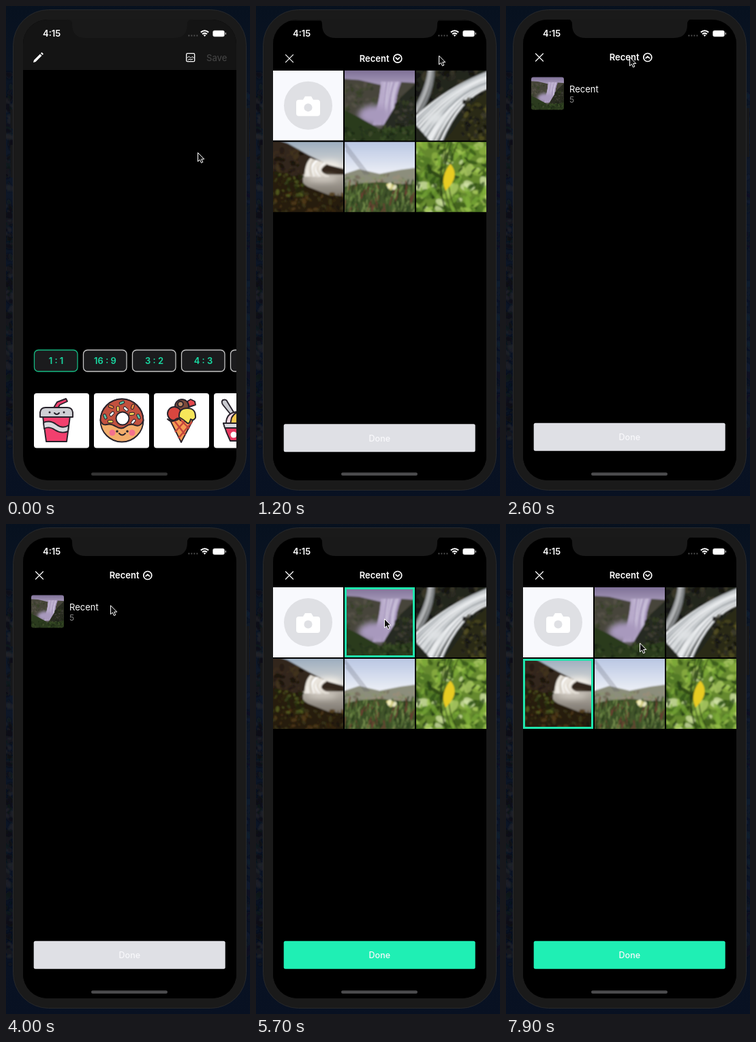
Animation, 358 px wide and 720 px high, one loop 8000 ms. Source, as an HTML page:

```html
<!DOCTYPE html>
<html lang="en">
<head>
<meta charset="utf-8">
<title>Photo picker</title>
<style>
  html, body { margin: 0; width: 100%; height: 100%; overflow: hidden; background: #0a1020; }
  svg { display: block; width: 100vw; height: 100vh; }
  text { font-family: Inter, "Liberation Sans", sans-serif; font-size: 13px; fill: #fff; }
  .b { font-weight: 600; }
  .mid { text-anchor: middle; }
  .ol { stroke: #27222b; stroke-width: 1.9; stroke-linejoin: round; stroke-linecap: round; }
  .ln { fill: none; stroke: #fff; stroke-linecap: round; stroke-linejoin: round; }
</style>
</head>
<body>
<svg id="stage" viewBox="0 0 358 720">
  <defs>
    <linearGradient id="desk" x2="0" y2="1">
      <stop stop-color="#07111f"/><stop offset=".3" stop-color="#0f1828"/><stop offset="1" stop-color="#081122"/>
    </linearGradient>
    <linearGradient id="dusk" x2="0" y2=".3"><stop stop-color="#6d5f88"/><stop offset="1" stop-color="#b3a6c4"/></linearGradient>
    <linearGradient id="dawn" x2="0" y2=".45"><stop stop-color="#8ea3ba"/><stop offset="1" stop-color="#e6e1d9"/></linearGradient>
    <linearGradient id="lake" x2="0" y2="1"><stop stop-color="#b5afa6"/><stop offset="1" stop-color="#6a645c"/></linearGradient>
    <linearGradient id="haze" x2="0" y2=".5"><stop stop-color="#b0bfdf"/><stop offset="1" stop-color="#f1f3f8"/></linearGradient>
    <filter id="soft"><feGaussianBlur stdDeviation=".8"/></filter>
    <filter id="mist" x="-1" y="-1" width="3" height="3"><feGaussianBlur stdDeviation="4"/></filter>
    <clipPath id="screen"><rect x="25" y="20" width="313" height="677" rx="36"/></clipPath>
    <clipPath id="cell"><rect width="103" height="103"/></clipPath>
    <clipPath id="thumb"><rect width="103" height="103" rx="7"/></clipPath>
    <clipPath id="below"><rect x="25" y="93" width="313" height="513"/></clipPath>
  </defs>

  <rect width="358" height="720" fill="url(#desk)"/>
  <g id="rock" filter="url(#soft)"></g>
  <path d="M8.500 152v28M8.500 204v48M355 150v72" stroke="#17181a" stroke-width="4"/>
  <rect x="10.500" y="5.500" width="342" height="706" rx="52" fill="#1a1a1a" stroke="#28292b"/>

  <g clip-path="url(#screen)">
    <rect x="25" y="20" width="313" height="677"/>
    <rect x="25" y="20" width="313" height="74" fill="#141414"/>
    <path d="M40 83l1-3.500 9-9 2.500 2.500-9 9zM51 69.500l1.500-1.500 2.500 2.500-1.500 1.500z" fill="#fff"/>
    <rect class="ln" x="264.700" y="69.700" width="12" height="12" rx="1.500" stroke-width="1.300"/>
    <path class="ln" d="M266 76l2.500-2 2.500 2.500 2-2 2.500 1.500M267 79.500l2-1.500 2 1 3-1"/>
    <text x="294" y="80.500" style="fill:#414141;font-weight:500">Save</text>
    <g id="ratios"></g>
    <g id="cards"></g>

    <g id="modal">
      <rect x="25" y="20" width="313" height="677"/>
      <path class="ln" d="M43.500 70l11 11m0-11l-11 11" stroke-width="1.200"/>
      <text x="151.800" y="80.300" class="b">Recent</text>
      <g id="chev" stroke-width="1.700"><circle class="ln" r="6"/><path class="ln" d="M-2.700-1.200L0 1.500 2.700-1.200"/></g>
      <g id="grid"></g>
      <rect id="pick" width="100" height="100" fill="none" stroke="#1fe6ad" stroke-width="3"/>
      <g clip-path="url(#below)">
        <g id="list">
          <rect x="25" y="93" width="313" height="513"/>
          <g id="album" transform="translate(37 104.500) scale(.466)"></g>
          <text x="93" y="126.500">Recent</text>
          <text x="93" y="142" style="font-size:12px;fill:#8a8a8a">5</text>
        </g>
      </g>
      <rect id="btn" x="40.700" y="612.700" width="281" height="41" rx="2.500"/>
      <text x="181.300" y="638" class="mid" style="font-size:12.500px;font-weight:500;fill:#f8f8fb">Done</text>
    </g>

    <rect id="home" x="125" y="685.500" width="112" height="4.500" rx="2.200"/>
    <text x="54" y="45" class="b">4:15</text>
    <path d="M267.500 43.500h14" stroke="#555" stroke-width="1.800" stroke-dasharray="1.800 2.200"/>
    <path class="ln" d="M285.800 38.600q5.700-4.600 11.400 0M288 41.300q3.500-2.800 7 0" stroke-width="2" style="stroke-linecap:butt"/>
    <path d="M289.700 42.800q1.800-1.400 3.600 0l-1.800 2.200z" fill="#fff"/>
    <rect x="303.500" y="36" width="17" height="9" rx="2.500" fill="#fff" stroke="#aaa" stroke-width=".6"/>
    <path d="M322.300 39v3" stroke="#aaa" stroke-width="1.400"/>
  </g>
  <path d="M89 19Q97 19 97 27Q97 47 117 47H246Q266 47 266 27Q266 19 274 19Z" fill="#191919"/>
  <path id="cursor" d="M0 0V13L3 10.400 5 15 7.300 14 5.300 9.500H9.300Z" fill="#111" stroke="#fff" stroke-linejoin="round"/>
</svg>

<script>
const $ = id => document.getElementById(id);
const repeat = (n, fn) => Array.from({ length: n }, (_, i) => fn(i)).join('');

let seed = 71;
const rnd = (lo = 0, hi = 1) => {
  seed = seed * 16807 % 2147483647;
  return +(lo + (hi - lo) * seed / 2147483647).toFixed(2);
};
const any = list => list[Math.floor(rnd(0, list.length - .01))];

const fullRect = fill => `<rect x="-9" y="-9" width="121" height="121" fill="${fill}"/>`;
const fog = (x, y, rx, ry, fill) => `<ellipse cx="${x}" cy="${y}" rx="${rx}" ry="${ry}" fill="${fill}" filter="url(#mist)"/>`;

// Ground below evenly spaced ridge heights.
function hill(ys, fill) {
  const step = 121 / (ys.length - 1);
  return `<path d="M-9 112${ys.map((y, i) => `L${i * step - 9} ${y}`).join('')}V112Z" fill="${fill}"/>`;
}

// Scattered leaves or stones in a box, flattened by a factor.
function blobs(n, x, y, w, h, r, cols, flat = .6) {
  return repeat(n, () => {
    const s = r * rnd(.4, 1.5);
    return `<ellipse rx="${s}" ry="${s * flat}" fill="${any(cols)}" opacity=".75" ` +
      `transform="translate(${rnd(x, x + w)} ${rnd(y, y + h)}) rotate(${rnd(0, 180)})"/>`;
  });
}

// Strands of water from one edge [x, y, dx, dy] over a bend to another edge.
function flow(n, a, bend, b, cols, wide = 2.5) {
  return repeat(n, () => {
    const u = rnd(), v = u + rnd(-.1, .1);
    return `<path d="M${a[0] + a[2] * u} ${a[1] + a[3] * u}Q${bend[0] + 12 * v} ${bend[1] + 14 * v} ` +
      `${b[0] + b[2] * v} ${b[1] + b[3] * v}" stroke="${any(cols)}" stroke-width="${wide}"/>`;
  });
}

function grass(n, top, cols) {
  return repeat(n, i => {
    const y = top + (112 - top) * i / n;
    return `<path d="M${rnd(-5, 108)} ${y}l${rnd(-3, 6)} ${rnd(-16, -6)}" stroke="${any(cols)}" stroke-width="1.600"/>`;
  });
}

const STONE = ['#171814', '#2b2b22', '#3d3c2c', '#111210'];
const WATER = ['#eceef0', '#c6cacd', '#a2a7ab', '#dcdfe1'];

const photos = [
  // Violet waterfall
  () => fullRect('url(#dusk)') + hill([12, 14, 21, 17, 19], '#46453a') +
    blobs(70, -5, 20, 50, 40, 3, ['#363c2a', '#4f4f3c', '#3c452c', '#57534a']) +
    flow(45, [54, 17, 28, 0], [54, 42], [44, 80, 36, 0], ['#c9bfd9', '#a595bb', '#b8aacb']) +
    fog(44, 66, 24, 15, '#a899bd') +
    hill([130, 112, 90, 40, 12], '#282b20') +
    blobs(55, 74, 36, 32, 50, 3, ['#232a1a', '#364024', '#191e15', '#43423a']) +
    hill([54, 69, 86, 84, 78], '#2b3b1e') +
    blobs(70, -5, 82, 112, 24, 3, ['#25341a', '#3a4f26', '#1c2815', '#465030']),

  // Stream between rocks
  () => fullRect('#24251e') + blobs(80, -5, -5, 110, 60, 5, STONE) +
    flow(10, [18, -6, 10, 0], [18, 20], [-6, 62, 16, 0], ['#8f9294', '#6f7375', '#b0b2b4']) +
    flow(60, [110, 0, 0, 24], [50, 22], [-6, 74, 36, 40], WATER) +
    fog(28, 70, 14, 8, '#dfe2e4') +
    hill([150, 128, 92, 48, 24], '#2c2b17') +
    blobs(80, 68, 42, 40, 62, 3.5, [...STONE, '#4a481d', '#5c5824']),

  // Waterfall by a lake
  () => fullRect('url(#dawn)') + fog(82, 36, 18, 8, '#f3efe8') +
    hill([-8, 2, 19, 34, 42], '#31251a') +
    blobs(70, -5, 12, 48, 44, 4, ['#241b13', '#3a2b1c', '#443520', '#17120d']) +
    `<rect x="44" y="48" width="70" height="40" fill="url(#lake)"/>` +
    flow(40, [53, 24, 26, 8], [48, 30], [46, 51, 38, 0], ['#fff', '#e9e4dc', '#d3ccc1']) +
    fog(72, 54, 22, 4, '#d8d2c9') +
    hill([42, 46, 66, 78, 80], '#281e0e') +
    blobs(100, -5, 76, 112, 32, 3, ['#35250f', '#543d18', '#1a1309', '#3f3b18']) +
    blobs(60, 0, 46, 46, 34, 3, ['#39441a', '#5c6823', '#20270f', '#2b2110']),

  // Meadow under wires
  () => fullRect('url(#haze)') + hill([50, 40, 47, 41, 37], '#8c8e7c') +
    blobs(60, -5, 48, 112, 14, 3, ['#6f7b5a', '#9c8d7a', '#89936f', '#756b5b']) +
    repeat(3, i => `<path d="M${i * 3 - 4} ${i * 8 - 4}L${36 - i * 3} 48" stroke="#4f505c" stroke-width=".8"/>`) +
    hill([68, 61, 59, 62, 62], '#405229') +
    grass(220, 68, ['#2f4720', '#5c783a', '#78914e', '#25361b', '#6f3b33', '#495f2f']) +
    blobs(9, 62, 63, 12, 5, 3, ['#f6f3cf', '#e8dd8a']),

  // Sunlit leaves
  () => fullRect('#65892f') +
    blobs(90, -5, -5, 113, 113, 8, ['#8fb343', '#b3cf6a', '#4c7524', '#d6e5ab', '#38581a']) +
    blobs(130, -5, -5, 113, 113, 7, ['#76a534', '#2f5017', '#9fc650', '#223a13', '#7fae3a'], .35) +
    flow(4, [30, -5, 40, 0], [20, 50], [30, 110, 38, 0], ['#2c4018'], 1.3) +
    '<path d="M50 32Q66 50 43 72 34 52 50 32Z" fill="#e8cc22"/>'
];

const dots = (list, r, fill) => list.map(([x, y]) => `<circle cx="${x}" cy="${y}" r="${r}" fill="${fill}"/>`).join('');
const ol = (d, fill = 'none') => `<path class="ol" d="${d}" fill="${fill}"/>`;
const ring = (x, y, r, fill) => `<circle class="ol" cx="${x}" cy="${y}" r="${r}" fill="${fill}"/>`;
const DARK = '#27222b';

function sprinkle(i) {
  const a = Math.PI * (.95 + i * .11), r = i % 2 ? 25 : 17;
  const col = ['#f7d154', '#62c3a5', '#fff', '#f58a3c'][i % 4];
  return `<g transform="translate(${41 + r * Math.cos(a)} ${39 + r * Math.sin(a)}) rotate(${i * 67})" stroke-linecap="round">` +
    `<path d="M-2 0h4" stroke="${DARK}" stroke-width="4.800"/><path d="M-2 0h4" stroke="${col}" stroke-width="2.800"/></g>`;
}

const stickers = [
  // Soda
  ol('M29 21L34 13 47 8 49 12 38 17 35 22Z', '#ef3f6c') + ol('M13 34H53L48 71H18Z', '#f2406e') +
    ol('M14 43Q24 39 33 46T51 47L50 56Q40 60 31 54T15 52Z', '#d9dade') +
    ol('M17 21H49Q56 21 57 28V35H9V28Q10 21 17 21Z', '#cfd0d4') +
    dots([[23, 28], [44, 28]], 1.5, DARK) + ol('M30 29q3.500 4 7 0'),
  // Donut
  ring(41, 40, 31.5, '#f3ad6b') +
    ol('M9.500 40A31.500 31.500 0 0 1 72.500 40q-4 10-12 7t-14 2-14 0-14-3-9-6Z', '#c2513f') +
    repeat(11, sprinkle) + ring(42, 37, 9.5, '#fff') +
    dots([[27, 58], [56, 58]], 4.5, '#f4718d') + dots([[34, 56], [49, 56]], 1.8, DARK) + ol('M37 59q4.500 5 9 0'),
  // Ice cream
  ol('M22 36H59L40 72Z', '#f59a52') +
    '<path d="M28 38L46 61M38 38L52 52M48 38L31 57M56 42L36 66" stroke="#c4443c" stroke-width="2.400"/>' +
    ol('M52 20L49 12 54 9 60 12 61 17Z', '#e5484d') +
    ring(41, 19, 10, '#7b4a3a') + ring(39, 16, 4, '#b98863') + ring(30, 30, 10, '#d9463f') +
    ol('M37 35Q36 22 49 22T61 36Q58 41 54 38 52 47 48 43T37 35Z', '#f6e65a') + ol('M20 38q6 6 11 1t8 1'),
  // Sundae
  ol('M13 10Q18 8 20 13L31 31 27 34 14 18Q10 13 13 10Z', '#c9cacf') + ol('M18 44Q18 28 36 27H60V46H18Z', '#f7d9e2') +
    ol('M26 36Q32 24 48 28V46H24Z', '#f6c84f') + ol('M14 44H66L62 70H24Q18 58 14 44Z', '#e8385f') +
    ol('M14 44H66V51H16Z', '#d9dade') + dots([[29, 61]], 4.5, '#fff')
];

const cellX = i => 25 + (i % 3) * 105;
const cellY = i => 93 + Math.floor(i / 3) * 105;

function build() {
  $('rock').innerHTML = blobs(160, 0, 100, 9, 550, 5, ['#15181d', '#20232a', '#0a0d13', '#101319']) +
    blobs(60, 353, 130, 5, 520, 6, ['#0d1728', '#111d30', '#0a1322']);

  $('ratios').innerHTML = ['1 : 1', '16 : 9', '3 : 2', '4 : 3', ''].map((s, i) => {
    const x = 41 + i * 72;
    return `<rect x="${x + .5}" y="505.500" width="63.500" height="31.500" rx="6" fill="#1b1b1d" stroke="${i ? '#c4c4c4' : '#16b982'}" stroke-width="1.300"/>` +
      `<text x="${x + 32.5}" y="526" class="b mid" style="fill:#19dca4">${s}</text>`;
  }).join('');

  $('cards').innerHTML = stickers.map((s, i) =>
    `<g transform="translate(${41 + i * 88} 569)"><rect width="81" height="80.500" rx="4" fill="#fff"/>${s}</g>`).join('');

  const camera = '<rect width="103" height="103" fill="#f8f9fd"/><circle cx="51.500" cy="51.500" r="35.500" fill="#dfe0e4"/>' +
    '<path d="M38 43h6l3-5h9l3 5h6q4 0 4 4v16q0 4-4 4H38q-4 0-4-4V47q0-4 4-4z" fill="#fff"/><circle cx="51.500" cy="54.500" r="6" fill="#dfe0e4"/>';
  const pictures = photos.map(paint => `<g filter="url(#soft)" fill="none">${paint()}</g>`);
  const clip = (s, id) => `<g clip-path="url(#${id})">${s}</g>`;
  $('grid').innerHTML = [camera, ...pictures]
    .map((s, i) => `<g transform="translate(${cellX(i)} ${cellY(i)})">${clip(s, 'cell')}</g>`).join('');
  $('album').innerHTML = clip(pictures[0], 'thumb');
}

const LOOP = 8000, GLIDE = 450;
// Places the pointer reaches; `cell` is the photo it clicks there.
const stops = [
  { at: 0, x: 281.5, y: 215.5 },
  { at: 600, x: 268.5, y: 73 },
  { at: 2150, x: 181.5, y: 75 },
  { at: 4100, x: 149.5, y: 126 },
  { at: 5450, x: 188.5, y: 139.5, cell: 1 },
  { at: 6500, x: 272, y: 232.5, cell: 5 },
  { at: 7350, x: 84, y: 246, cell: 3 },
  { at: 7880, x: 196.5, y: 175 }
];

const ramp = (t, start, span) => {
  const v = Math.min(1, Math.max(0, (t - start) / span));
  return v * v * (3 - 2 * v);
};
const move = (id, x, y, more = '') => $(id).setAttribute('transform', `translate(${x} ${y}) ${more}`);
const show = (id, on) => $(id).style.display = on ? '' : 'none';

function draw(t) {
  let { x, y } = stops[0];
  for (const s of stops) {
    const k = ramp(t, s.at - GLIDE, GLIDE);
    x += (s.x - x) * k;
    y += (s.y - y) * k;
  }
  move('cursor', x, y);

  // Critically damped spring for the sheet
  const w = Math.max(0, t - 750) * .0183;
  move('modal', 0, 677 * (1 + w) * Math.exp(-w));
  show('modal', w > 0);
  $('home').setAttribute('fill', w > 0 ? '#4b4b4d' : '#333');

  const open = ramp(t, 2200, 350) - ramp(t, 4400, 400);
  move('list', 0, -513 * (1 - open));
  show('list', open > 0);
  const turn = ramp(t, 2200, 300) - ramp(t, 4750, 300);
  move('chev', 207.8, 75.5, `rotate(${-180 * turn})`);

  const hit = stops.filter(s => s.cell && s.at + 50 <= t).pop();
  show('pick', hit);
  if (hit) move('pick', cellX(hit.cell) + 1.5, cellY(hit.cell) + 1.5);
  $('btn').setAttribute('fill', hit ? '#1fefb4' : '#dfe0e5');
}

build();
const start = performance.now();
function tick() {
  draw((performance.now() - start) % LOOP);
  requestAnimationFrame(tick);
}
tick();
</script>
</body>
</html>
```
